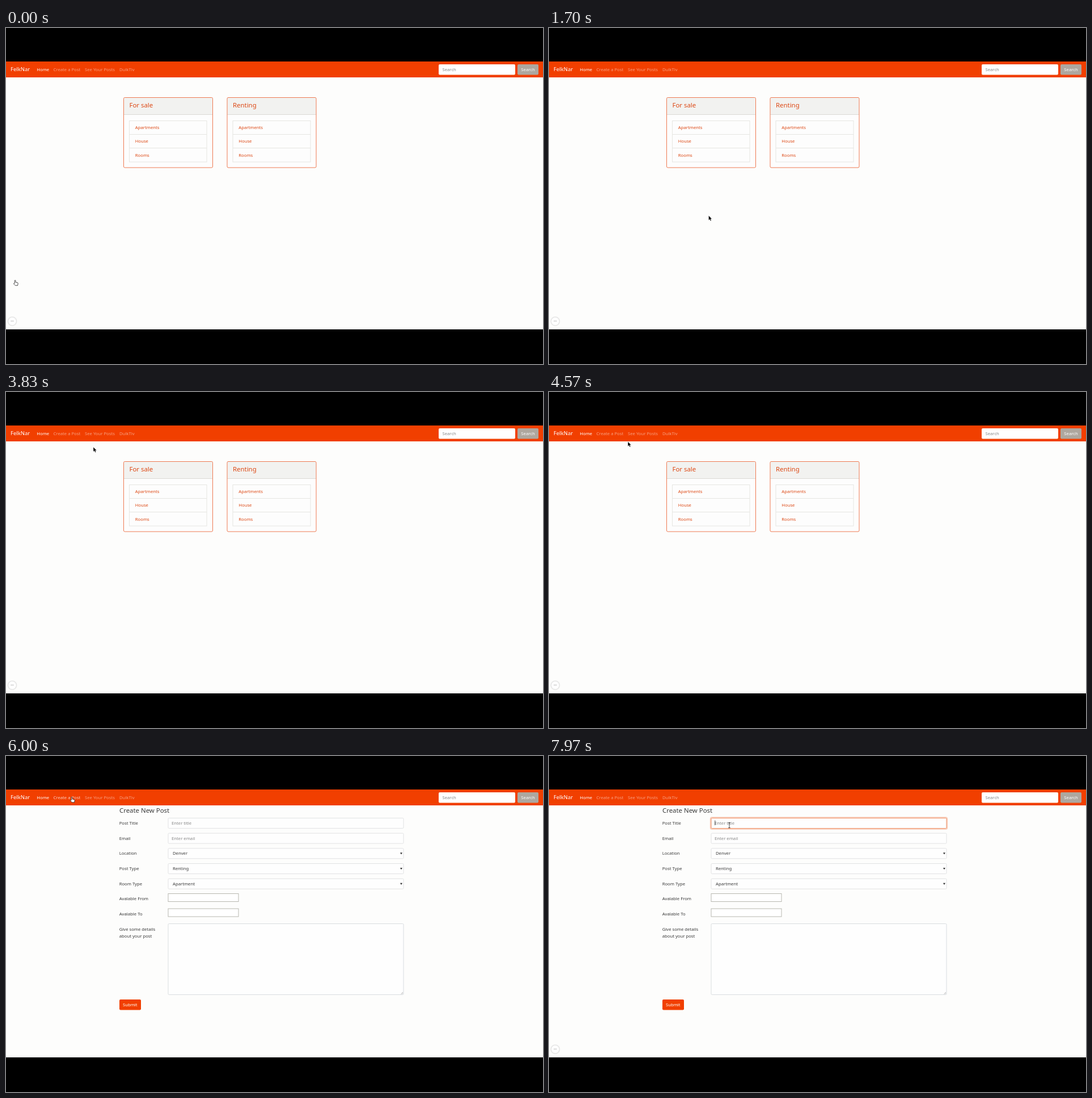
Recreate the animation shown at these times as an HTML page. Size 947 px wide and 592 px high, loop 8 s.

```html
<!DOCTYPE html>
<html lang="en">
<head>
<meta charset="utf-8">
<title>Rental listings</title>
<style>
  html, body { margin: 0; width: 100%; height: 100%; overflow: hidden; background: #000; }
  svg { display: block; width: 947px; height: 592px; }
  text { font: 7.7px "Noto Sans", "Open Sans", sans-serif; fill: #3a3a3a; }
  .heading { font-size: 11.4px; }
  .brand { font-size: 9.5px; }
  .white { fill: #fff; }
  .nav { fill: #fff; fill-opacity: .5; }
  .orange { fill: #dd4814; }
  .hint { fill: #878787; }
  .tip { font-size: 5px; fill: #ddd; }
  .middle { text-anchor: middle; }
  .round { fill: #fff; filter: drop-shadow(0 .8px .9px rgba(0, 0, 0, .35)); }
  .icon { fill: none; stroke: #777; }
</style>
</head>
<body>
<svg id="stage" viewBox="0 0 947 592"></svg>
<script>
const LOOP = 8000;
const ORANGE = '#f13f00';

const text = (x, y, label, cls = '', extra = '') =>
  `<text x="${x}" y="${y}" class="${cls}" ${extra}>${label}</text>`;
const rect = (x, y, w, h, fill, stroke = 'none', r = 0, extra = '') =>
  `<rect x="${x}" y="${y}" width="${w}" height="${h}" rx="${r}" fill="${fill}" stroke="${stroke}" ${extra}/>`;
const line = (x1, x2, y, color) => `<path d="M${x1} ${y}H${x2}" stroke="${color}"/>`;

function navbar() {
  return rect(0, 59, 947, 28, ORANGE) +
    text(8, 76.4, 'FelkNar', 'brand white') +
    text(54.3, 75.8, 'Home', 'white') +
    text(83.5, 75.8, 'Create a Post', 'nav', 'id="createLink"') +
    text(139, 75.8, 'See Your Posts', 'nav') +
    text(200, 75.8, 'DulkTiv', 'nav') +
    rect(763, 64, 135, 18.5, '#fff', 'none', 2) +
    text(769.5, 75.8, 'Search', 'hint') +
    rect(902, 64, 37, 18.5, '#aea79f', 'none', 2) +
    text(920.5, 75.8, 'Search', 'white middle');
}

function card(x, title, listWidth) {
  const rows = ['Apartments', 'House', 'Rooms'];
  return rect(x, 122.5, 157, 123.5, '#fdfdfd', 'none', 2) +
    rect(x, 122.5, 157, 30.5, '#f2f2f0', 'none', 2) +
    line(x, x + 157, 152.5, '#dcdad6') +
    rect(x, 122.5, 157, 123.5, 'none', '#ee7a52', 2) +
    text(x + 10, 139.7, title, 'heading orange') +
    rect(x + 10, 163.5, listWidth, 72.5, 'none', '#e6e6e2') +
    line(x + 10, x + 10 + listWidth, 187.5, '#e6e6e2') +
    line(x + 10, x + 10 + listWidth, 211.5, '#e6e6e2') +
    rows.map((row, i) => text(x + 20.3, 178.2 + i * 24.2, row, 'orange')).join('');
}

function form() {
  const labels = ['Post Title', 'Email', 'Location', 'Post Type', 'Room Type', 'Avalable From', 'Avalable To', 'Give some details'];
  const fields = ['Enter title', 'Enter email', 'Denver', 'Renting', 'Apartment'];
  const rowY = i => 120.9 + i * 26.7;
  const field = (label, i) => {
    const select = i > 1;
    const y = rowY(i);
    return rect(286, y - 11.5, 415, 18, '#fefefe', '#e1e2e3', 1.5) +
      text(select ? 294 : 292, y, label, select ? '' : 'hint') +
      (select ? `<path d="M695 ${y - 4}h4l-2 3.2z" fill="#333"/>` : '');
  };
  return text(200, 99.8, 'Create New Post', 'heading') +
    labels.map((label, i) => text(199.7, rowY(i), label)).join('') +
    text(199.7, 319.6, 'about your post') +
    fields.map(field).join('') +
    rect(286, 242.5, 124, 14, '#fff', '#b8b8b0') +
    rect(286, 269, 124, 14, '#fff', '#b8b8b0') +
    rect(286, 295.5, 415, 125, '#fefefe', '#d9dde0', 1.5) +
    '<path d="M696.5 419.5l3.5-3.5M698.5 419.5l1.5-1.5" stroke="#888" stroke-width=".6"/>' +
    rect(200, 429, 38, 18.5, ORANGE, 'none', 2) +
    text(218.8, 441, 'Submit', 'white middle') +
    '<g id="focus">' +
      rect(284.8, 108.3, 417.4, 20.4, 'none', '#f9cdb9', 2.5, 'stroke-width="2"') +
      rect(286, 109.5, 415, 18, 'none', '#f19870', 1.5) +
      '<path d="M292.8 113.5v8.5" stroke="#222" stroke-width=".8"/>' +
    '</g>';
}

function recorderButtons() {
  const icons = [
    [32, '<path class="icon" d="M-4.5-3h6.5v6h-6.5zM2-.5l3-2v5l-3-2M-1.3-1.5v3M-2.8 0h3" stroke-width=".9"/>'],
    [53.6, '<path class="icon" d="M-3-3l6 6M3-3l-6 6" style="stroke:#f4695c"/>'],
    [75.4, '<path class="icon" d="M-1.6-3.5v7M1.6-3.5v7" stroke-width="1.4"/>'],
    [97, '<path class="icon" d="M-3.5 0l2.4 2.5 4.7-4.8" style="stroke:#fff" stroke-width="1.3"/>']
  ];
  return icons.map(([x, icon], i) =>
    `<g class="action" data-x="${x}"><circle r="9.8" class="round"${i === 3 ? ' style="fill:#00e676"' : ''}/>${icon}</g>`
  ).join('');
}

const stage = document.getElementById('stage');
stage.innerHTML =
  rect(0, 0, 947, 592, '#000') +
  rect(0, 59, 947, 472, '#fdfdfc') +
  navbar() +
  `<g id="home">${card(207.5, 'For sale', 136.5)}${card(390, 'Renting', 137)}</g>` +
  `<g id="form">${form()}</g>` +
  `<g id="recorder"><circle cx="11" cy="516.8" r="7" class="round"/>
    <path d="M8.5 516.3h5" stroke="#888" stroke-width=".9" stroke-dasharray="1.2 .7"/></g>` +
  recorderButtons() +
  `<g id="tooltip">${rect(5, 492, 47, 11, '#555', 'none', 4.5)}${text(28.5, 499.4, 'Hide Menu', 'tip middle')}</g>
  <g id="cursor">
    <path id="arrow" d="M0 0V8.3L1.9 6.6 3.2 9.5 4.7 8.8 3.4 6H5.9z" fill="#000" stroke="#fff" stroke-width=".4"/>
    <path id="hand" transform="translate(-3 -.5)" fill="#fff" stroke="#222" stroke-width=".8"
      d="M2.2 6V1.3a.9.9 0 0 1 1.8 0V4l3 .6q1.3.3 1.2 1.6l-.7 3.5H3.4L.3 6.5q.6-1.1 1.9-.5z"/>
    <path id="beam" d="M-1.8-4.5h3.6M0-4.5v9M-1.8 4.5h3.6" stroke="#222" stroke-width=".8"/>
  </g>`;

// Pointer stops: time, x, y of the hot spot
const path = [
  [0, 16, 444.5], [100, 16, 444.5], [450, 7.5, 514], [900, 7.5, 514],
  [1650, 281.5, 330.5], [1750, 281.5, 330.5], [2500, 272, 316],
  [3150, 112, 73], [3400, 112, 73], [3800, 154, 97], [4250, 154, 97],
  [5000, 116, 72.5], [6170, 116, 72.5], [6640, 274, 187.5],
  [6860, 274, 187.5], [6970, 318, 122], [LOOP, 318, 122]
];

const el = id => document.getElementById(id);
const show = (id, visible) => { el(id).style.display = visible ? '' : 'none'; };
const ramp = (t, start, end) => {
  const p = Math.min(1, Math.max(0, (t - start) / (end - start)));
  return p * p * (3 - 2 * p);
};

function pointer(t) {
  const i = path.findIndex(stop => stop[0] > t);
  const [t0, x0, y0] = path[i - 1];
  const [t1, x1, y1] = path[i];
  const p = ramp(t, t0, t1);
  return [x0 + (x1 - x0) * p, y0 + (y1 - y0) * p];
}

function draw(t) {
  const [x, y] = pointer(t);
  const onForm = t >= 5900;
  const onLink = x > 83 && x < 131 && y > 67 && y < 80;
  const inField = onForm && x > 286 && y > 109 && y < 127;
  const onHand = onLink || t < 950;

  show('home', !onForm);
  show('form', onForm);
  show('recorder', t < 5900 || t > 6250);
  show('hand', onHand);
  show('beam', inField);
  show('arrow', !onHand && !inField);
  el('cursor').setAttribute('transform', `translate(${x} ${y})`);
  el('createLink').style.fillOpacity = onLink ? .75 : .5;
  el('focus').style.opacity = ramp(t, 7490, 7700);
  el('tooltip').style.opacity = ramp(t, 420, 560) - ramp(t, 950, 1080);

  document.querySelectorAll('.action').forEach((button, i) => {
    const size = ramp(t, 300 + i * 40, 440 + i * 40) - ramp(t, 1100, 1280);
    button.setAttribute('transform', `translate(${button.dataset.x} 516.8) scale(${size})`);
  });
}

function tick() {
  draw(performance.now() % LOOP);
  requestAnimationFrame(tick);
}
tick();
</script>
</body>
</html>
```
